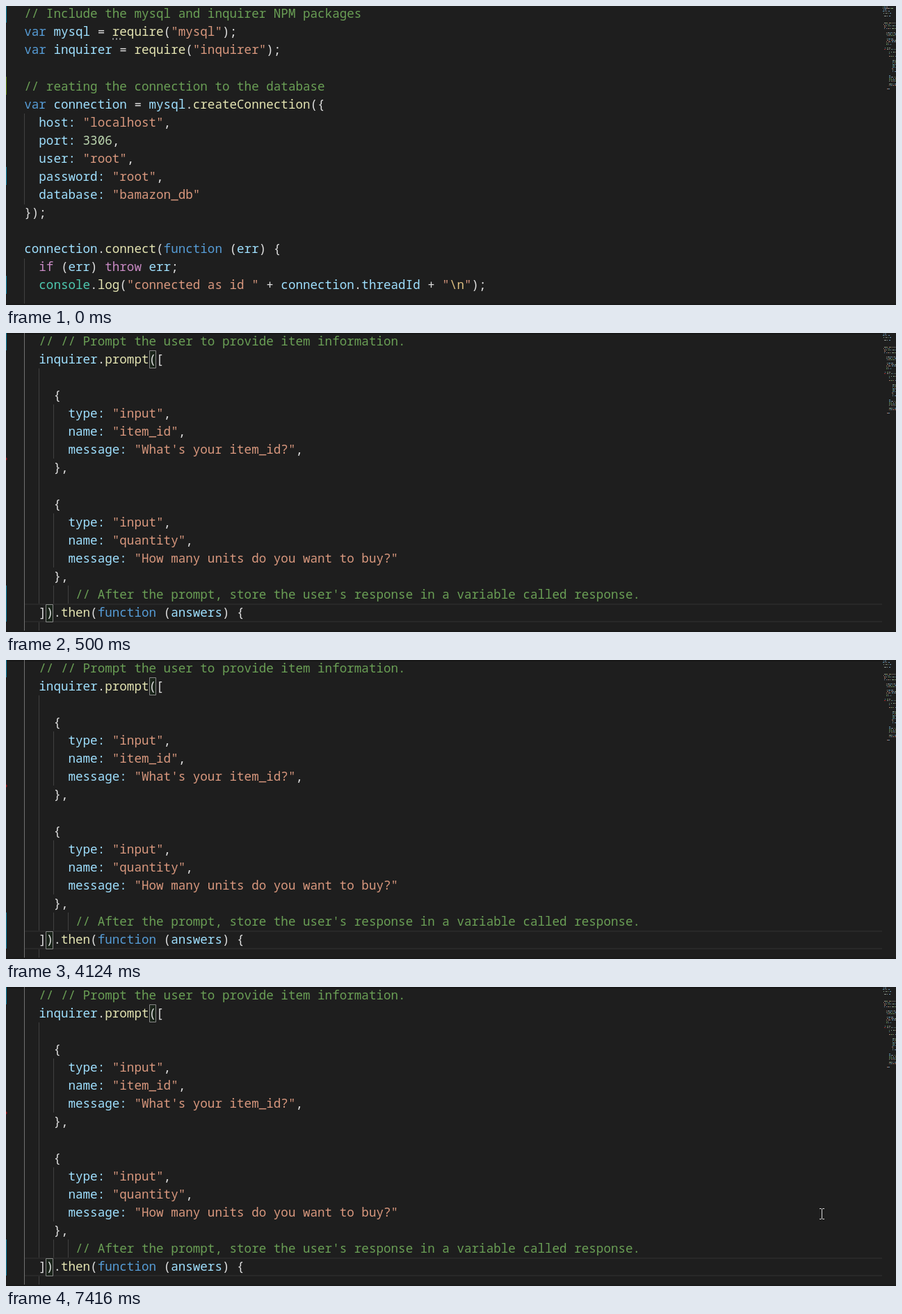
An HTML page that plays this animation: 1280x431 px, repeating every 8000 ms.

```html
<!DOCTYPE html>
<html lang="en">
<head>
<meta charset="utf-8">
<title>Code editor</title>
<style>
  html, body { margin: 0; width: 100%; height: 100%; overflow: hidden; background: #1e1e1e; }
  svg { display: block; width: 100%; height: 100%; }
  text { font: 500 17.58px "Noto Sans Mono", monospace; white-space: pre; font-variant-ligatures: none; }
  .comment { fill: #6a9f55; } .escape { fill: #dcbe80; } .string { fill: #d9987e; }
  .keyword { fill: #569cd6; } .control { fill: #c98ac4; } .object { fill: #4ec9b0; }
  .call { fill: #e4e4b2; } .number { fill: #bbd4ae; } .name { fill: #9fe0ff; }
  .plain { fill: #e0e0e0; }
</style>
</head>
<body>
<svg viewBox="0 0 1280 431" preserveAspectRatio="none">
  <g id="connect">
    <path d="M26.5 155V286M26.5 364V431" stroke="#404040"/>
    <path d="M.5 0V24M.5 232V258M.5 389V415" stroke="#0c7d9d"/>
    <path d="M.5 102V128" stroke="#587c0c"/>
    <path d="M153 47.5h2m3 0h2m3 0h2" stroke="#a0a0a0" stroke-width="2"/>
  </g>
  <g id="prompt">
    <path d="M0 1H1260" stroke="#171717" stroke-width="2"/>
    <path d="M27 391H1260M27 416H1260" stroke="#282828" stroke-width="2"/>
    <path d="M47.5 51V390M47.5 417V431M68.5 103V181M68.5 260V338M68.5 364V390M89.5 364V390" stroke="#404040"/>
    <path d="M26.5 0V431" stroke="#707070"/>
    <path d="M.5 0V25M.5 364V416" stroke="#0c7d9d"/>
    <path d="M0 179l2 2.500-2 2.500z" fill="#94151b"/>
    <path d="M206.500 25.500h9v25h-9zM57.500 391.500h10v25h-10z" fill="#1b251b" stroke="#888"/>
  </g>
  <path d="M0 430H1280" stroke="#191919" stroke-width="2"/>
  <path id="pointer" d="M1170 319.500h2.500l1 1 1-1h2.500M1173.500 320v14M1170 334.500h2.500l1-1 1 1h2.500" fill="none" stroke="#d8d8d8"/>
</svg>
<script>
const connectCode = String.raw`// Include the mysql and inquirer NPM packages
var mysql = require("mysql");
var inquirer = require("inquirer");

// reating the connection to the database
var connection = mysql.createConnection({
  host: "localhost",
  port: 3306,
  user: "root",
  password: "root",
  database: "bamazon_db"
});

connection.connect(function (err) {
  if (err) throw err;
  console.log("connected as id " + connection.threadId + "\n");`;

const promptCode = `  // // Prompt the user to provide item information.
  inquirer.prompt([

    {
      type: "input",
      name: "item_id",
      message: "What's your item_id?",
    },

    {
      type: "input",
      name: "quantity",
      message: "How many units do you want to buy?"
    },
       // After the prompt, store the user's response in a variable called response.
  ]).then(function (answers) {`;

const rules = {
  comment: /\/\/.*/,
  escape: /\\n/,
  string: /(?<=\\n)"|"[^"\\]*(?:"|(?=\\))/,
  keyword: /\b(?:var|function)\b/,
  control: /\b(?:if|throw)\b/,
  object: /\bconsole\b/,
  call: /\w+(?=\()/,
  number: /\d+/,
  name: /\w+:?/,
  plain: /[^\w"\\\/]+/
};
const tokenPattern = new RegExp(
  Object.entries(rules).map(([kind, rule]) => `(?<${kind}>${rule.source})`).join("|"), "g");

const byId = id => document.getElementById(id);

function add(parent, tag, attributes) {
  const node = document.createElementNS("http://www.w3.org/2000/svg", tag);
  for (const key in attributes) node.setAttribute(key, attributes[key]);
  return parent.appendChild(node);
}

function drawCode(scene, code, top) {
  code.split("\n").forEach((line, row) => {
    const text = add(scene, "text", { x: 26.2, y: top + row * 26.07 });
    for (const { 0: token, groups } of line.matchAll(tokenPattern)) {
      const kind = Object.keys(groups).find(key => groups[key] !== undefined);
      add(text, "tspan", { class: kind }).textContent = token;
    }
  });
}

// Each block of the minimap: top, bottom, left edge.
const blocks = [[1, 9, 1261], [10, 20, 1262], [24, 33, 1262], [36, 43, 1266], [47, 56, 1266],
  [60, 64, 1263], [66, 74, 1270], [78, 95, 1274], [100, 116, 1269], [119, 121, 1266], [125, 127, 1261]];
const inks = ["#6690b0", "#88a58c", "#a5796a", "#909090", "#5f97b2", "#6b925b"];

function drawMinimap(scene, shift) {
  let seed = 17;
  const random = () => (seed = seed * 16807 % 2147483647) / 2147483647;
  const map = add(scene, "g", { transform: `translate(0 ${-shift})` });
  for (const [top, bottom, left] of blocks)
    for (let y = top; y < bottom; y += 2)
      for (let x = left + Math.floor(random() * 2); x < 1280; x += 2 + Math.floor(random() * 2)) {
        const width = 1 + Math.floor(random() * 2);
        const fill = inks[Math.floor(random() * inks.length)];
        if (bottom - top < 3 && x > left + 4 || random() < 0.1) break;
        add(map, "rect", { x, y, width, height: 1, fill });
      }
  add(map, "rect", { x: 1263, y: 62, width: 2, height: 1, fill: "#a03030" });
}

const connect = byId("connect"), prompt = byId("prompt"), pointer = byId("pointer");
drawCode(connect, connectCode, 17.3);
drawCode(prompt, promptCode, 18);
drawMinimap(connect, 0);
drawMinimap(prompt, 4);

const show = (node, visible) => node.style.display = visible ? "" : "none";

function render() {
  const time = performance.now() % 8000;
  show(connect, time < 500);
  show(prompt, time >= 500);
  show(pointer, time >= 6540);
  requestAnimationFrame(render);
}
render();
</script>
</body>
</html>
```
